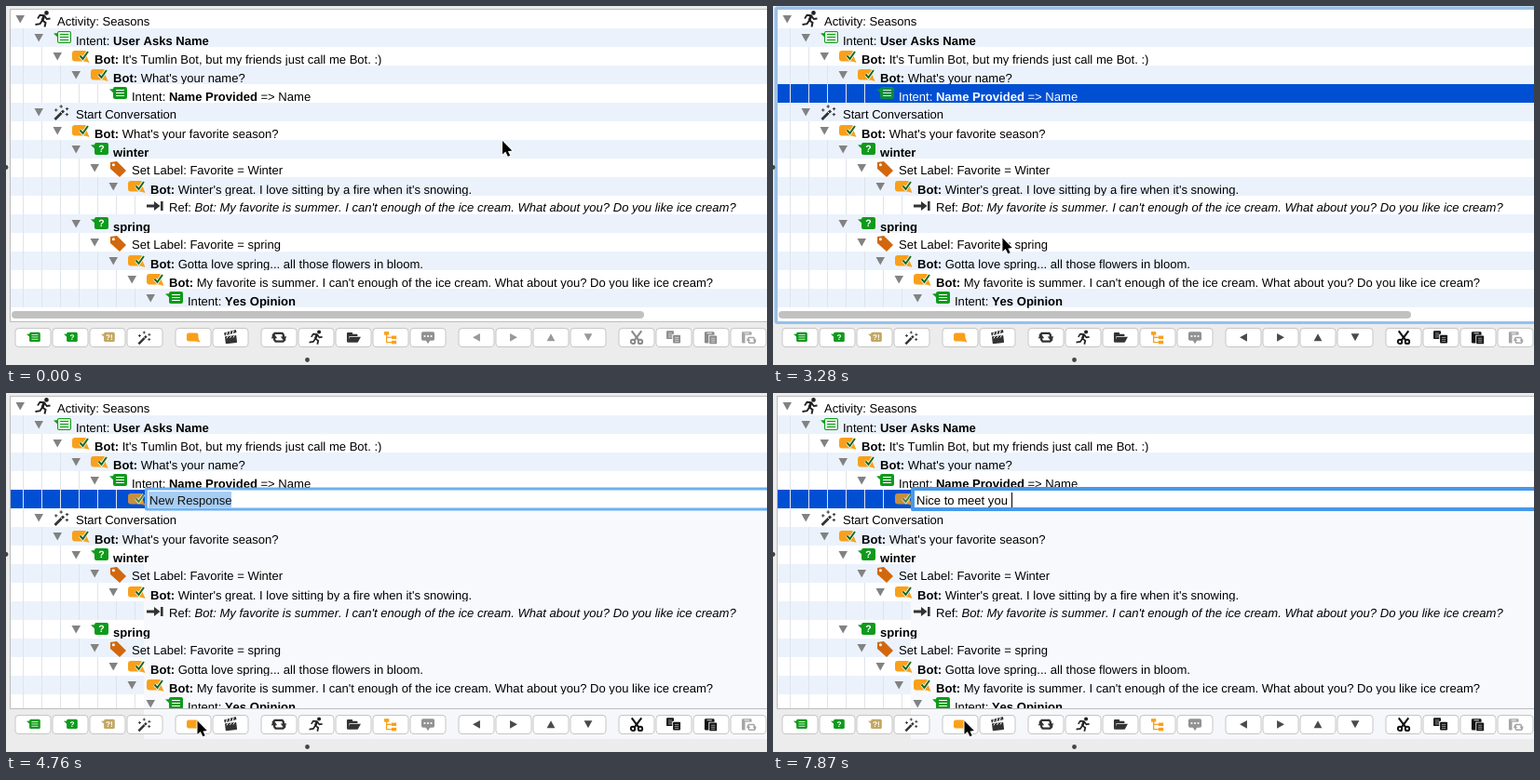
Animation, 817 px wide and 386 px high, one loop 8000 ms. Source, as an HTML page with a canvas:

```html
<!DOCTYPE html>
<html lang="en">
<head>
<meta charset="utf-8">
<title>Conversation tree editor</title>
<style>
html, body { margin: 0; width: 100%; height: 100%; overflow: hidden; background: #ececec; }
canvas { display: block; }
</style>
</head>
<body>
<canvas id="stage" width="817" height="386"></canvas>
<script>
const ctx = document.getElementById('stage').getContext('2d');
const W = 817, H = 386, LOOP = 8000, STEP = 148;
const ROW = 20, TOP = 4, BOTTOM = 339;
const GREEN = '#109a1c', ORANGE = '#f9a01b', TAN = '#c3a763', BLUE = '#004fd3', DARK = '#333';
const FAMILY = '"Liberation Sans", Arial, sans-serif';

// Moments of the scene, in ms
const MOVE_UP = 1350, SELECT = 2240, MOVE_DOWN = 2840, PRESS = 4020, EDIT = 4320,
  FOCUS = 4760, FOCUSED = 5210, TYPE = 5500;

// *bold* and _italic_ runs; each row is [depth, icon, text, leaf]
const summer = "My favorite is summer. I can't enough of the ice cream. What about you? Do you like ice cream?";
const rows = [
  [0, 'runner', 'Activity: Seasons'],
  [1, 'intentLight', 'Intent: *User Asks Name*'],
  [2, 'bot', "*Bot:* It's Tumlin Bot, but my friends just call me Bot. :)"],
  [3, 'bot', "*Bot:* What's your name?"],
  [4, 'intent', 'Intent: *Name Provided* => Name', true],
  [1, 'wand', 'Start Conversation'],
  [2, 'bot', "*Bot:* What's your favorite season?"],
  [3, 'question', '*winter*'],
  [4, 'tag', 'Set Label: Favorite = Winter'],
  [5, 'bot', "*Bot:* Winter's great. I love sitting by a fire when it's snowing."],
  [6, 'ref', `Ref: _Bot: ${summer}_`, true],
  [3, 'question', '*spring*'],
  [4, 'tag', 'Set Label: Favorite = spring'],
  [5, 'bot', '*Bot:* Gotta love spring... all those flowers in bloom.'],
  [6, 'bot', `*Bot:* ${summer}`],
  [7, 'intent', 'Intent: *Yes Opinion*']
];
const editedRows = rows.slice();
editedRows[4] = rows[4].slice(0, 3);
editedRows.splice(5, 0, [5, 'bot', '', true]);

function rect(color, x, y, w, h, r = 0) {
  ctx.fillStyle = color;
  ctx.beginPath();
  ctx.roundRect(x, y, w, h, r);
  ctx.fill();
}
function trace(pts) {
  ctx.beginPath();
  for (let i = 0; i < pts.length; i += 2) ctx.lineTo(pts[i], pts[i + 1]);
}
function poly(color, ...pts) {
  trace(pts);
  ctx.fillStyle = color;
  ctx.fill();
}
function line(color, width, ...pts) {
  trace(pts);
  ctx.strokeStyle = color;
  ctx.lineWidth = width;
  ctx.stroke();
}
function dot(color, x, y, r) {
  ctx.fillStyle = color;
  ctx.beginPath();
  ctx.arc(x, y, r, 0, 7);
  ctx.fill();
}
function ring(color, width, x, y, r) {
  ctx.strokeStyle = color;
  ctx.lineWidth = width;
  ctx.beginPath();
  ctx.arc(x, y, r, 0, 7);
  ctx.stroke();
}
function at(x, y, draw, scale = 1, angle = 0) {
  ctx.save();
  ctx.translate(x, y);
  ctx.scale(scale, scale);
  ctx.rotate(angle);
  draw();
  ctx.restore();
}
function text(str, x, y, color) {
  ctx.fillStyle = color;
  for (const run of str.split(/(\*[^*]+\*|_[^_]+_)/)) {
    const style = run[0] === '*' ? 'bold ' : run[0] === '_' ? 'italic ' : '';
    const plain = style ? run.slice(1, -1) : run;
    ctx.font = `${style}13.06px ${FAMILY}`;
    ctx.fillText(plain, x, y);
    x += ctx.measureText(plain).width;
  }
  return x;
}

// Icons fill a box of about 18 by 14.
function bubble(color) {
  rect(color, 4, 0, 15, 13, 2);
  poly(color, 0, 2.5, 6, 2, 6, 8);
}
function mark(str) {
  ctx.fillStyle = '#fff';
  ctx.font = `bold 10.5px ${FAMILY}`;
  ctx.textAlign = 'center';
  ctx.fillText(str, 11.5, 10.2);
  ctx.textAlign = 'left';
}
function textLines(color, x, y, width, gap) {
  for (let k = 0; k < 3; k++) rect(color, x, y + k * gap, width, 1);
}
function orangeBubble() {
  rect(ORANGE, 0, 1, 16, 11.5, 3);
  poly(ORANGE, 9, 11, 16, 8, 18.5, 14);
}
function sheet(color, x, y) {
  rect('#fff', x - 1, y - 1, 11, 12, 1);
  rect(color, x, y, 9, 10, 1);
  textLines('#ffffffa0', x + 2, y + 2.5, 5, 2.3);
}
function clipboard(color) {
  rect(color, 1, 0, 12, 14, 1.5);
  rect('#fff', 4, 1.5, 6, 1);
}
// Two half loops with arrowheads, one the other turned around
function cycle(color, size) {
  for (const turn of [0, Math.PI]) at(9, 7, () => {
    line(color, 2.6, -7, 1, -7, -3, -5, -5, 4, -5, 5.5, -3, 5.5, 0);
    poly(color, 2, -1, 9.5, -1, 5.7, 4);
  }, size, turn);
}
function arrow(color, angle) {
  at(9, 7, () => poly(color, 4.5, 0, -4.5, 5, -4.5, -5), 1, angle);
}

const icons = {
  intent() { bubble(GREEN); textLines('#fff', 7, 3, 9, 3); },
  intentLight() {
    bubble(GREEN);
    rect('#d9f3d8', 5, 1, 13, 11, 1);
    textLines(GREEN, 7, 3, 9, 3);
  },
  question() { bubble(GREEN); mark('?'); },
  tanQuestion() { bubble(TAN); mark('?!'); },
  orange: orangeBubble,
  bot() {
    orangeBubble();
    for (const [color, width] of [['#fff', 3.6], ['#176b25', 2]])
      line(color, width, 8.5, 6.5, 11.5, 9.8, 17, 2);
  },
  runner() {
    const c = '#222';
    dot(c, 12.5, 2.4, 2.3);
    line(c, 1.8, 3, 8.5, 5.5, 4.8, 10, 5.2, 12.8, 9, 16.5, 8.5);
    line(c, 3, 10, 5.5, 8, 10.5);
    line(c, 2, .5, 15, 5.5, 14.2, 8, 10.5, 11.5, 13, 10.5, 17.5);
  },
  wand() {
    line(DARK, 2.8, 1.5, 15, 11, 5.5);
    line('#fff', 1, 8, 7, 9.7, 8.6);
    for (let k = 0; k < 4; k++) {
      const a = .6 - k * 1.15, x = 9 + 6.5 * Math.cos(a), y = 6.5 + 5.5 * Math.sin(a);
      rect(DARK, x - 1.7, y - .5, 3.4, 1);
      rect(DARK, x - .5, y - 1.7, 1, 3.4);
    }
  },
  tag() {
    poly('#d2670d', 1, 1, 8, 0, 18, 10, 11, 17, 1, 8);
    dot('#fff', 4.4, 3.8, 1.5);
  },
  ref() {
    rect(DARK, 0, 6.5, 9, 3);
    poly(DARK, 8, 3, 14.5, 8, 8, 13);
    rect(DARK, 15, 3, 2.6, 10);
  },
  clapper() {
    at(2, 5, () => {
      rect(DARK, 0, 1, 14, 9, 1);
      at(0, 0, () => {
        rect(DARK, 0, -3.5, 15, 3.5);
        for (let x = 2; x < 14; x += 4) line('#fff', 1.2, x, 0, x + 2, -3.5);
      }, 1, -.15);
      for (let x = 2; x < 14; x += 4) line('#fff', 1, x, 3.5, x + 2, 1);
    }, 1, -.12);
  },
  refresh() { cycle(DARK, 1); },
  folder() {
    rect(DARK, 1, 1, 7, 5, 1);
    rect(DARK, 1, 3, 13, 10, 1);
    poly('#fff', 4, 5.5, 18, 5.5, 15, 12, 3, 12);
    poly(DARK, 4.5, 6.5, 18, 6.5, 14.5, 13, 2, 13);
  },
  tree() {
    line(ORANGE, 1.5, 4, 3, 4, 13, 10, 13);
    line(ORANGE, 1.5, 4, 7, 10, 7);
    rect(ORANGE, 1, 0, 6, 4);
    for (const y of [5, 11]) rect(ORANGE, 10, y, 6, 4);
  },
  comment() {
    rect('#929292', 1, 0, 16, 11, 2);
    poly('#929292', 6, 10, 12, 10, 9, 15);
    for (let x = 5; x < 15; x += 4) dot('#fff', x, 5.5, 1.2);
  },
  left(c) { arrow(c, Math.PI); },
  right(c) { arrow(c, 0); },
  up(c) { arrow(c, -Math.PI / 2); },
  down(c) { arrow(c, Math.PI / 2); },
  cut(c) {
    for (const side of [-1, 1]) {
      line(c, 2.4, 9 + side * 6, -1, 9 - side * 3, 11);
      ring(c, 2.2, 9 + side * 4.5, 12.2, 2.5);
    }
  },
  copy(c) { sheet(c, 0, -1); sheet(c, 8, 4); },
  paste(c) { clipboard(c); sheet(c, 7, 5); },
  pasteLink() {
    clipboard('#a5a5a5');
    rect('#fff', 5, 4, 14, 12);
    at(7, 6, () => cycle('#a5a5a5', 1), .65);
  }
};

const groups = [
  { x: 29, names: ['intent', 'question', 'tanQuestion', 'wand'] },
  { x: 201, names: ['orange', 'clapper'] },
  { x: 293, names: ['refresh', 'runner', 'folder', 'tree', 'comment'] },
  { x: 505, names: ['left', 'right', 'up', 'down'], off: '#999', on: '#4a4a4a' },
  { x: 677, names: ['cut', 'copy', 'paste', 'pasteLink'], off: '#8a8a8a', on: '#111' }
];
const speech = ['intent', 'question', 'tanQuestion', 'orange'];

function drawButton(name, x, color, active) {
  let fill = '#fff';
  if (active) {
    fill = ctx.createLinearGradient(0, 346, 0, 367);
    fill.addColorStop(0, '#62abf8');
    fill.addColorStop(1, '#1768e6');
  }
  rect(active ? '#2a6fd0' : '#c6c6c6', x - 19.5, 346, 39, 21, 4.5);
  rect(fill, x - 18.5, 347, 37, 19, 3.5);
  const scale = speech.includes(name) ? .78 : .88;
  const middle = name === 'runner' ? 9 : 7;
  at(x - 9 * scale, 356.3 - middle * scale, () => icons[name](color), scale);
}
function drawToolbar(enabled, pressed) {
  for (const { x, names, off, on } of groups)
    names.forEach((name, i) =>
      drawButton(name, x + 40 * i, enabled ? on : off, pressed && name === 'orange'));
}

function drawRow([depth, icon, label, leaf], i, selected, muted) {
  const y = TOP + ROW * i, x = 20 * depth;
  rect(i % 2 ? '#ebf2fc' : '#fff', 5, y, W, ROW);
  if (muted && i > 5) rect('#f7f9fd', 148, y, W, ROW);
  if (selected) rect(BLUE, 5, y, W, ROW);
  for (let k = 0; k < depth + (leaf ? 1 : 0); k++) rect('#dfe4ea', 18 + 20 * k, y, 1, ROW);
  if (!leaf) poly('#828282', x + 10.5, y + 6, x + 20, y + 6, x + 15.2, y + 14.5);
  ctx.globalAlpha = selected ? .8 : 1;
  at(x + 31, y + (icon === 'runner' ? 1 : 3), icons[icon]);
  ctx.globalAlpha = 1;
  text(label, x + 55, y + (label.includes('*') ? 18 : 17), selected ? '#fff' : '#000');
}

function typed(t) {
  const n = Math.floor((t - TYPE + 4) / STEP);
  const ahead = n >= 6 && n < 10 ? 1 : 0; // a quick key, then a pause
  return 'Nice to meet you '.slice(0, n + 1 + ahead);
}
function drawField(t) {
  const focus = (t >= FOCUS) + (t >= FOCUSED);
  const edge = 2 + focus, top = 102 - focus / 2;
  rect(['#8fc0f2', '#6db0f0', '#4799ea'][focus], 150 - focus, top, W, 24 + focus, 2);
  rect('#fff', 152, top + edge, W, 24 + focus - 2 * edge);
  if (t < TYPE) {
    rect('#a8cdf3', 153, 106, 89, 17);
    text('New Response', 154, 120, '#111');
  } else {
    const end = text(typed(t), 154, 120, '#000');
    rect('#000', Math.round(end + .5), 107, 1, 16);
  }
}

// The pointer glides in whole steps between resting places.
function glide(t, start, steps) {
  const p = Math.min(1, Math.max(0, Math.floor((t - start + 4) / STEP) / steps));
  return p * p * (3 - 2 * p);
}
function drawPointer(t) {
  const mix = (a, b, p) => a + (b - a) * p;
  const up = glide(t, MOVE_UP, 4), down = glide(t, MOVE_DOWN - STEP, 7);
  const start = t < MOVE_UP ? [533, 145] : [515, 140];
  const x = mix(mix(start[0], 309.5, up), 205.5, down);
  const y = mix(mix(start[1], 91, up), 352.5, down);
  at(x, y, () => {
    const head = [0, 0, 0, 14.5, 3.4, 11.4, 10.3, 10.4, 0, 0], tail = [3.5, 9, 7, 16.2];
    line('#fff', 2, ...head);
    line('#fff', 4.2, ...tail);
    poly('#000', ...head);
    line('#000', 2.6, ...tail);
  });
}

function draw(t) {
  const selected = t >= SELECT, editing = t >= EDIT, pressed = t >= PRESS && !editing;
  const muted = t >= FOCUS;
  rect('#ececec', 0, 0, W, H);
  if (muted) rect('#f6f7fa', 148, BOTTOM, W, 33);
  rect('#bdbdbd', 4, 3, W, BOTTOM - 2);
  ctx.save();
  ctx.beginPath();
  ctx.rect(5, TOP, W, BOTTOM - TOP);
  ctx.clip();
  rect('#fff', 5, TOP, W, H);
  (editing ? editedRows : rows).forEach((row, i) =>
    drawRow(row, i, selected && i === (editing ? 5 : 4), muted));
  if (!editing) {
    rect('#fff', 5, 325, W, 14);
    rect('#c1c1c1', 6, 328, 679, 8, 4);
  }
  ctx.restore();
  if (editing) drawField(t);
  else if (selected) {
    ctx.strokeStyle = pressed ? '#65a9f1' : '#93c1ee';
    ctx.lineWidth = pressed ? 4 : 3;
    ctx.beginPath();
    ctx.roundRect(3, 2, W + 10, 338.5, 2);
    ctx.stroke();
  }
  drawToolbar(selected, pressed);
  dot('#444', 323.5, 380.5, 2.4);
  dot('#444', 0, 173.5, 2.4);
  drawPointer(t);
}

ctx.textRendering = 'geometricPrecision';
ctx.fontKerning = 'none';
const started = performance.now();
function tick() {
  draw((performance.now() - started) % LOOP);
  requestAnimationFrame(tick);
}
tick();
</script>
</body>
</html>
```
